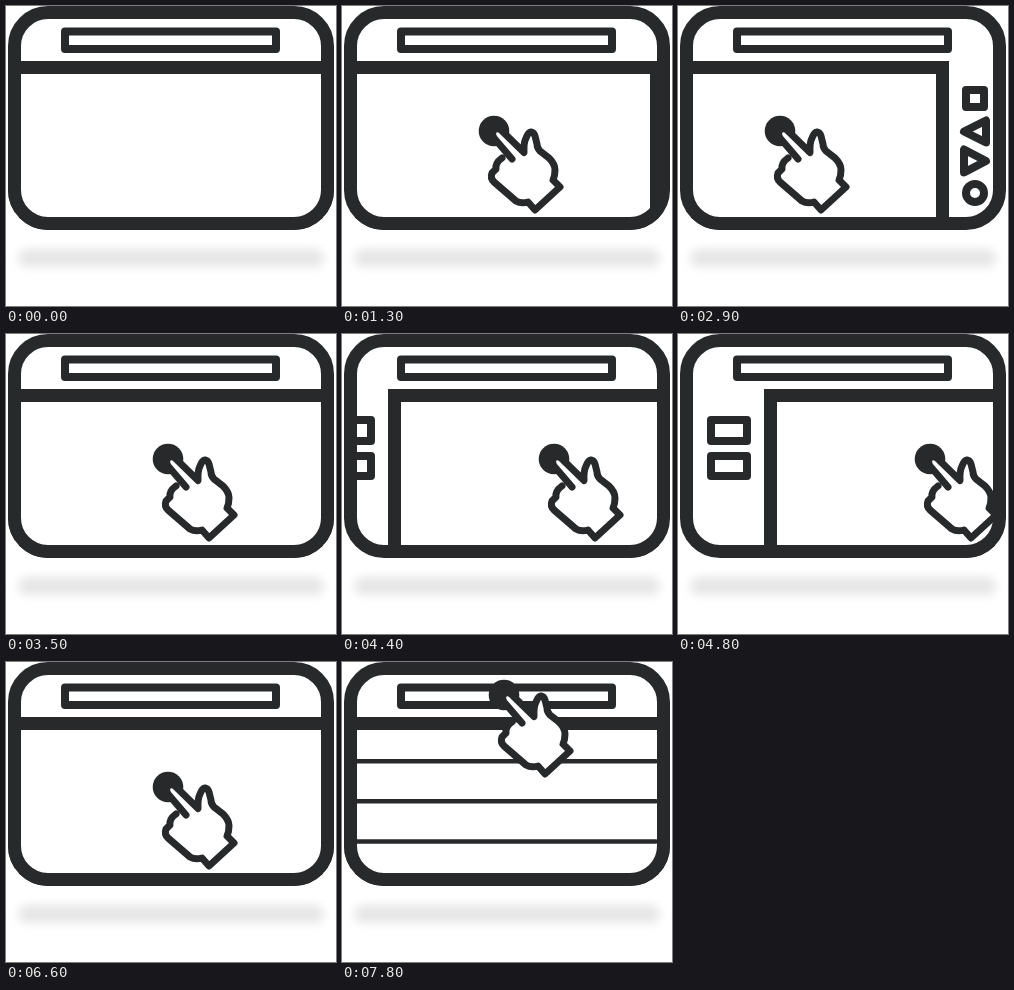
An HTML page for the animation above (8 s loop, 330 by 300 pixels).

```html
<!DOCTYPE html>
<html lang="en">
<head>
<meta charset="utf-8">
<title>Browser gestures</title>
<style>
  html, body { margin: 0; width: 100%; height: 100%; overflow: hidden; background: #fff; }
  svg { display: block; width: 100%; height: 100%; }
  .ink { fill: none; stroke: #27292b; stroke-linejoin: round; stroke-linecap: round; }
  .frame { stroke-width: 13; }
  .icon { stroke-width: 8; }
</style>
</head>
<body>
<svg viewBox="0 0 330 300">
  <defs>
    <clipPath id="screen"><rect x="2" width="326" height="224" rx="40"/></clipPath>
    <filter id="soft" x="-10%" y="-150%" width="120%" height="400%">
      <feGaussianBlur stdDeviation="5"/>
    </filter>
  </defs>

  <rect x="12" y="243" width="306" height="18" rx="9" fill="#e6e6e6" filter="url(#soft)"/>

  <g clip-path="url(#screen)">
    <g id="slider" class="ink">
      <rect class="frame" x="2.5" y="61.5" width="322" height="156" stroke-linejoin="miter" style="stroke-linejoin:miter"/>
      <g class="icon">
        <rect x="-57" y="86" width="36" height="21"/>
        <rect x="-57" y="122" width="36" height="20"/>
        <rect x="348" y="84" width="18" height="17"/>
        <path d="M346 125.5L368 114.5V136.5Z M346 143.5V166.5L368 155Z"/>
        <circle cx="357" cy="187" r="9"/>
      </g>
    </g>
  </g>

  <path id="list" class="ink" stroke-width="4.5" d="M15 99.3H314M15 139.3H314M15 179.5H314"/>
  <rect class="ink frame" x="8.5" y="6.5" width="313" height="211" rx="33.5"/>
  <rect class="ink icon" x="59" y="25.5" width="211" height="17.5"/>

  <g id="hand">
    <circle r="15.3" fill="#27292b"/>
    <path class="ink" stroke-width="7" style="fill:#fff" d="M18 28L0 7Q-3 2 0 -1Q4 -4 8 0L30 21.500
      Q29.500 12 32 7Q34 1.500 37 1Q40 1.500 41 5L43 13Q43 17 46 20L55 27Q61 33 61 39Q61 45 59 49
      L66 56L41 79L34 71Q27 73 22 70L0 51Q-4 47 -2 42L2 38Q1 32 8 27"/>
  </g>
</svg>
<script>
  const LOOP = 8000, TICK = 100, REST = { x: 162, y: 125 };
  const [slider, list, hand] = ["slider", "list", "hand"].map(id => document.getElementById(id));

  // Number of ticks taken so far in a move; the first falls on its start time.
  const ticks = (t, start, count) =>
    Math.max(0, Math.min(count, Math.floor((t - start) / TICK) + 1));

  const move = (node, x, y) => node.setAttribute("transform", `translate(${x} ${y})`);
  const show = (node, visible) => node.setAttribute("visibility", visible ? "visible" : "hidden");

  function draw(t) {
    const drag = 10 * (ticks(t, 2900, 7) - ticks(t, 1300, 7)
                     + ticks(t, 4000, 9) - ticks(t, 5800, 9));
    const enter = 50 * (ticks(t, 500, 4) - 4);
    const pressed = t >= 7800;
    const lift = pressed ? -92 : -29 * ticks(t, 7100, 3);

    move(slider, drag, 0);
    move(hand, REST.x + drag, REST.y + enter + lift);
    show(hand, t >= 500);
    show(list, pressed);
  }

  const began = performance.now();
  function loop() {
    draw((performance.now() - began) % LOOP);
    requestAnimationFrame(loop);
  }
  loop();
</script>
</body>
</html>
```
